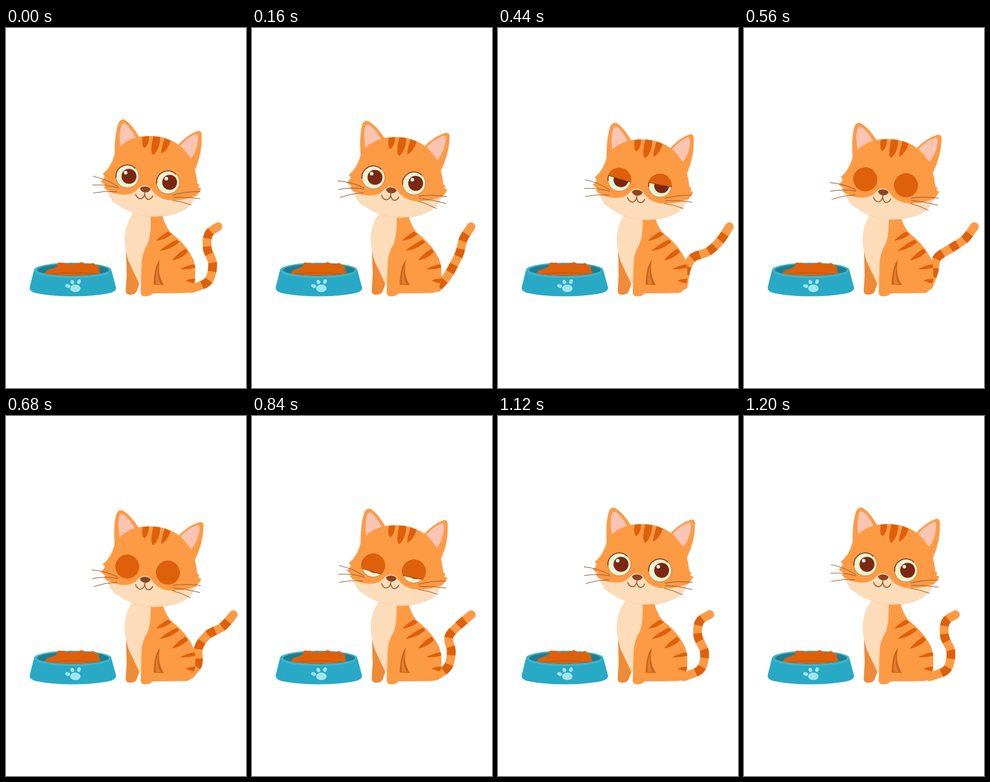
Animation, 360 px wide and 540 px high, one loop 1.24 s. Source, as an HTML page:

```html
<!DOCTYPE html>
<html lang="en">
<head>
<meta charset="utf-8">
<title>Cat and bowl</title>
<style>
  html, body { margin: 0; width: 100%; height: 100%; overflow: hidden; background: #fff; }
  svg { display: block; width: 100vw; height: 100vh; }
  .fur { fill: #fd9a44; }
  .dark { fill: #de600a; }
  .cream { fill: #fddcba; }
  .pink { fill: #fbc4b3; }
  .line { fill: none; stroke: #965a30; stroke-linecap: round; }
  .lid { stroke: #9a430d; }
  .tail { fill: none; stroke-width: 13; }
</style>
</head>
<body>
<svg viewBox="0 0 360 540">
  <defs>
    <clipPath id="eyeClip"><circle r="17.8"/></clipPath>
    <g id="eye">
      <circle r="17.3" fill="#e9f3d2" stroke="#b0652f" stroke-width=".7"/>
      <path d="M-17 2A17 17 0 0 1 12 -12" fill="none" stroke="#7a3516" stroke-width="1.3"/>
      <circle cx="2.5" r="11.2" fill="#7c2712"/>
      <circle cx="-2.5" cy="-5.5" r="2.7" fill="#f4f8e4"/>
    </g>
  </defs>

  <g id="bowl">
    <path d="M42 363L35.500 389Q35 395 44 397.500Q68 402.500 100 402.500Q132 402.500 156 397.500Q166 395 165 389L158 363Z" fill="#28a9c6"/>
    <ellipse cx="100" cy="363" rx="58" ry="11" fill="#3eb4c8"/>
    <ellipse cx="100.500" cy="363" rx="54" ry="8.800" fill="#1d7e93"/>
    <g id="food" class="dark">
      <path d="M57 368Q64 362 72 360Q80 355 92 354.500L126 354Q138 355 142 368Q122 371.500 100 371.500Q76 371.500 57 368Z"/>
    </g>
    <path d="M68 369Q100 365 134 369" fill="none" stroke="#c65208"/>
    <path d="M46 367Q64 373.500 100 373.500Q136 373.500 154 367" fill="none" stroke="#3eb4c8" stroke-width="3"/>
    <g fill="#a3e4f0">
      <ellipse cx="104" cy="390.500" rx="7.800" ry="5.800"/>
      <ellipse cx="92.500" cy="387" rx="3.800" ry="2.700" transform="rotate(20 92.500 387)"/>
      <ellipse cx="99.500" cy="381" rx="2.700" ry="3.300" transform="rotate(-20 99.500 381)"/>
      <ellipse cx="109.500" cy="380.500" rx="2.700" ry="3.500" transform="rotate(15 109.500 380.500)"/>
    </g>
  </g>

  <path id="tail" class="tail" stroke="#fd9a44" stroke-linecap="round"/>
  <path id="rings" class="tail" stroke="#de600a" stroke-dasharray="0 13 12 12 12 14 13 14 13 300"/>

  <g id="body">
    <path d="M180 335L181 370L179.500 395Q180 400 186 400Q194 400 196 395L200 384L194 350Z" fill="#ef8a36"/>
    <path class="cream" d="M190 278Q177 298 178 320Q179 335 184 350L200 384L206 380L220 318L222 278Z"/>
    <path class="fur" d="M217 278L234 278Q237 294 247 307Q270 324 281 347Q286 362 283 380Q279 397 271 397.500L220 398Q217 402.500 208 402.500Q202 402.500 202 396L203.500 352Q204 338 212 325Q218 312 217 278Z"/>
    <g class="dark">
      <path d="M225 319Q234 310 243 305.500L249 309Q238 318 225 319Z"/>
      <path d="M230 334.500Q242 324 256 317.500L260 321Q247 333 230 334.500Z"/>
      <path d="M249 348.500Q258 337 269 331L273 336Q263 346.500 249 348.500Z"/>
      <path d="M261 362Q272 355.500 283 354.500L284 359.500Q273 362.500 261 362Z"/>
      <path d="M269 379Q276 375.500 284 376L282.500 383Q276 382 269 379Z"/>
    </g>
    <path d="M231 347.500Q222 358 221.500 385L237 385.500Q226 370 231 347.500Z" fill="#c9651d"/>
    <path class="fur" d="M229 356Q225 372 232 384L225 384Q223 368 229 356Z" opacity=".5"/>
  </g>

  <g id="head">
    <g id="earL">
      <path class="fur" d="M163 198Q162 160 169 142Q172 136 178 137.500Q190 145 201 166L196 205Z"/>
      <path class="pink" d="M172 183Q168 156 174 144Q177 141 182 146Q190 154 196 168Z"/>
    </g>
    <g id="earR">
      <path class="fur" d="M256 178Q270 161 287 154.500Q293 153 293.500 160Q295 186 284 212L262 208Z"/>
      <path class="pink" d="M260 178Q271 164 285 159Q288 159 288 164Q288 181 278 196Z"/>
    </g>
    <path class="fur" d="M163 189C173 170 193 162 215 162C244 162 263 175 272 189C281 202 285 214 287 233L290 235L288.500 239L293 241Q289 249 283 254Q274 281 222 283Q190 281 170 266Q157 259 153 245L147 239L149 236L142 230Q147 227 148 222L145 219Q158 209 163 189Z"/>
    <path class="cream" d="M152 243Q160 249 176 250Q192 250 199 240Q208 232 217 240Q224 254 242 258Q264 260 284 252Q275 281 222 283Q190 281 170 266Q156 257 152 243Z"/>
    <g class="dark">
      <path d="M205 163L214.500 162Q215 174 208 180Q203 179 205 163Z"/>
      <path d="M221 162.300L231.500 163.500Q231 182 221 190.500Q215 187 221 162.300Z"/>
      <path d="M238 165L247 169Q243 183 233 188.500Q232 184 238 165Z"/>
    </g>
    <g transform="translate(182 222.500)"><use href="#eye"/><g clip-path="url(#eyeClip)"><path class="lid dark"/></g></g>
    <g transform="translate(243 231.500)"><use href="#eye"/><g clip-path="url(#eyeClip)"><path class="lid dark"/></g></g>
    <path d="M201 241Q202 237.500 209 237.500Q216 238.500 217 242Q214 247 208.500 246.500Q203 246 201 241Z" fill="#8b4520"/>
    <path class="line" stroke-width="1.500" d="M208.500 246L208 250Q205 258 199 255.500Q195 253 194.500 249.500M208 250Q210 258 215 257Q219 255.500 220 252"/>
    <g id="whiskL" class="line" stroke-width=".9">
      <path d="M131 222.500Q152 227 168 238M130 235.500Q150 234 168 240M131 247.500Q148 244 166 245.500"/>
    </g>
    <g id="whiskR" class="line" stroke-width=".9">
      <path d="M250 250.500Q270 245 291 245.500M251 254Q270 253 291 256M250 258.500Q264 260 278 265.500"/>
    </g>
  </g>
</svg>
<script>
const LOOP = 1240, STEP = 40;
const $ = id => document.getElementById(id);

// Tail poses: time, then points from tip to base.
const poses = [
  [0, 318, 298, 304, 309, 302, 331, 310, 354, 303, 380, 278, 391],
  [280, 338, 298, 328, 321, 318, 341, 298, 352, 285, 366, 278, 388],
  [440, 347, 298, 334, 318, 316, 335, 293, 344, 283, 360, 278, 386],
  [680, 341, 298, 325, 316, 303, 328, 289, 347, 288, 372, 276, 388],
  [840, 329, 298, 308, 316, 295, 332, 299, 353, 294, 376, 276, 390],
  [1000, 321, 297.5, 304, 310, 299, 331, 307, 355, 301, 378, 278, 391]
];

const ramp = (t, a, b) => {
  const u = Math.min(1, Math.max(0, (t - a) / (b - a)));
  return u * u * (3 - 2 * u);
};

function poseAt(i) {
  const n = poses.length, k = (i + n) % n;
  return [poses[k][0] + Math.floor(i / n) * LOOP, ...poses[k].slice(1)];
}

// Cubic interpolation through the poses, wrapping around the loop.
function tailPoints(t) {
  let i = poses.length - 1;
  while (poses[i][0] > t) i--;
  const [a, b, c, d] = [-1, 0, 1, 2].map(k => poseAt(i + k));
  const span = c[0] - b[0], u = (t - b[0]) / span;
  const s = u * u * (3 - 2 * u);
  return b.slice(1).map((v, j) => {
    const k = j + 1;
    const m0 = (c[k] - a[k]) / (c[0] - a[0]) * span;
    const m1 = (d[k] - b[k]) / (d[0] - b[0]) * span;
    return v + (c[k] - v) * s + m0 * u * (1 - u) ** 2 - m1 * u * u * (1 - u);
  });
}

// Smooth path through a flat list of x, y pairs.
function curve(p) {
  const last = p.length / 2 - 1;
  const at = (i, axis) => p[2 * Math.min(last, Math.max(0, i)) + axis];
  let d = `M${p[0]} ${p[1]}`;
  for (let i = 0; i < last; i++) {
    const one = [0, 1].map(x => at(i, x) + (at(i + 1, x) - at(i - 1, x)) / 6);
    const two = [0, 1].map(x => at(i + 1, x) - (at(i + 2, x) - at(i, x)) / 6);
    d += `C${one} ${two} ${at(i + 1, 0)} ${at(i + 1, 1)}`;
  }
  return d;
}

function addFood() {
  for (let i = 0; i < 14; i++) {
    const x = 64 + i * 5.5;
    const y = x < 80 ? 366 - (x - 64) * 0.4 : x > 134 ? 360 : 356.5 - Math.sin(i * 2.3);
    const dot = document.createElementNS("http://www.w3.org/2000/svg", "circle");
    dot.setAttribute("cx", x);
    dot.setAttribute("cy", y);
    dot.setAttribute("r", 3.6 + 0.8 * Math.sin(i * 5));
    $("food").append(dot);
  }
}

const lids = document.querySelectorAll(".lid");
const spin = (id, angle, x, y) => $(id).setAttribute("transform", `rotate(${angle} ${x} ${y})`);

function draw(t) {
  const drop = 5 * (ramp(t, 0, 440) - ramp(t, 440, 1120));
  const twitch = Math.sin(3 * Math.PI * t / LOOP) ** 2;
  const shut = ramp(t, 320, 570) - ramp(t, 740, 1000);

  $("head").setAttribute("transform", `translate(0 ${drop})`);
  spin("earL", -5 * twitch, 182, 188);
  spin("earR", 5 * twitch, 272, 200);
  spin("whiskL", -9 * twitch, 168, 241);
  spin("whiskR", 9 * twitch, 250, 255);

  const edge = -27 + 54 * shut;
  lids.forEach((lid, i) => {
    const tilt = i ? 4 : 6;
    lid.setAttribute("d", `M-20 -50H20V${edge + tilt}Q0 ${edge + 1} -20 ${edge - tilt}Z`);
  });

  const d = curve(tailPoints(t));
  $("tail").setAttribute("d", d);
  $("rings").setAttribute("d", d);
}

function tick(now) {
  let t = Math.floor(now % LOOP / STEP) * STEP;
  if (t === 40 || t === 1040) t -= STEP; // two poses are held twice as long
  draw(t);
  requestAnimationFrame(tick);
}

addFood();
draw(0);
requestAnimationFrame(tick);
</script>
</body>
</html>
```
